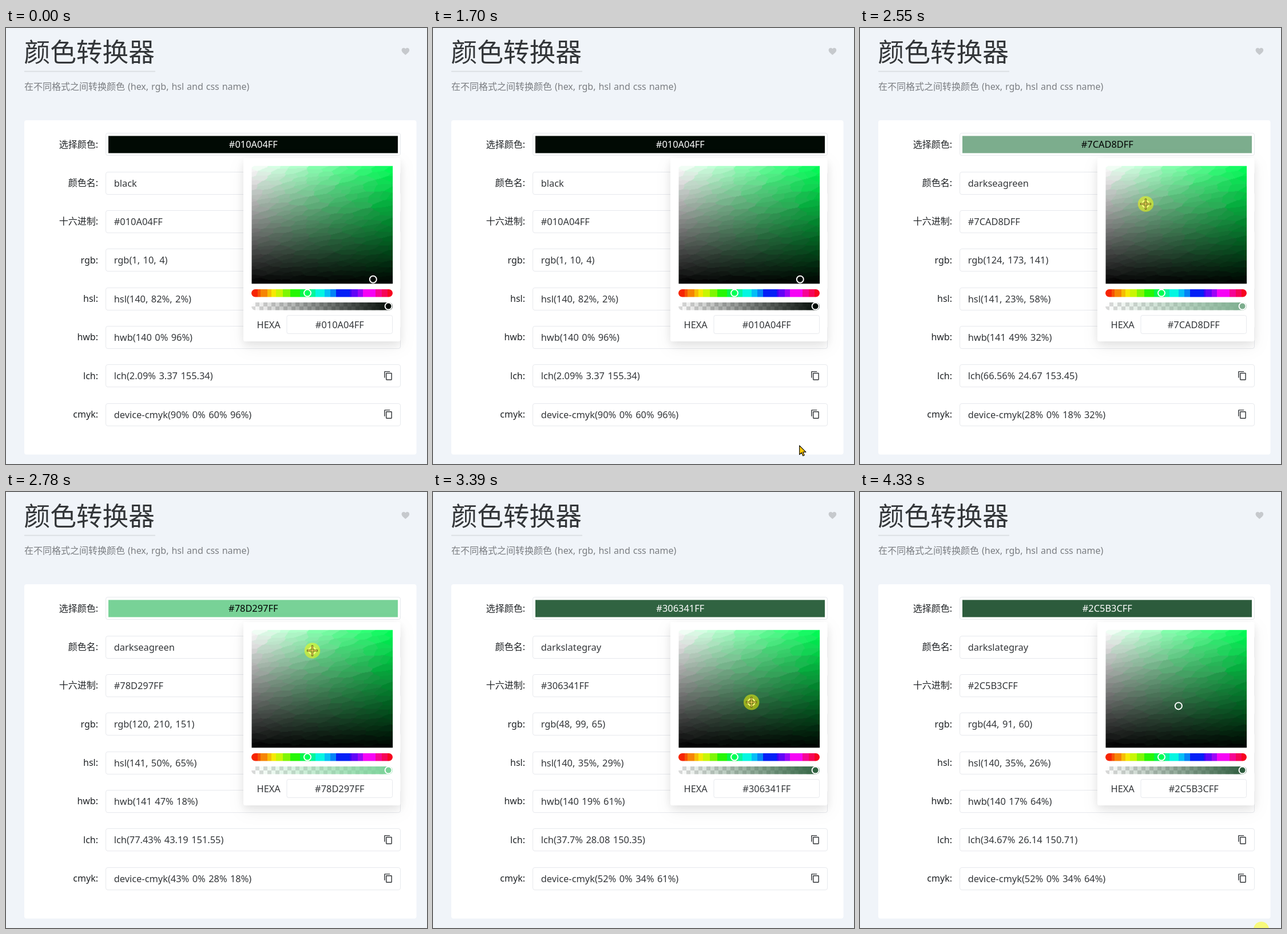
Animation, 736 px wide and 761 px high, one loop 4.4 s. Source, as an HTML page with a canvas:

```html
<!DOCTYPE html>
<html lang="zh-CN">
<head>
<meta charset="utf-8">
<title>颜色转换器</title>
<style>
  html, body { margin: 0; width: 736px; height: 761px; overflow: hidden; background: #f0f4f9; }
  svg, canvas { position: absolute; left: 0; top: 0; display: block; }
  #area { left: 429px; top: 240px; transform: translate(.3px, .6px); }
  text { font: 16.4px "Noto Sans", "Noto Sans CJK SC", sans-serif; fill: #333639; word-spacing: 1.2px; white-space: pre; }
  .title { font-size: 45.7px; font-weight: 300; fill: #333639; }
  .sub { font-size: 16px; fill: #7b7e82; word-spacing: .8px; }
  .label { font-size: 16px; fill: #1f2225; text-anchor: end; }
  .mid { text-anchor: middle; }
  .box { fill: #fff; stroke: #e7e9ed; }
  .glow { fill: none; stroke: #18a058; opacity: 0; }
  .icon { fill: none; stroke: #333639; stroke-width: 2; }
  .ring { stroke: #fff; stroke-width: 2; }
  .popup { fill: #fff; filter: drop-shadow(0 6px 8px rgba(0, 0, 0, .08)) drop-shadow(0 9px 14px rgba(0, 0, 0, .06)); }
</style>
</head>
<body>
<svg id="page" width="736" height="761">
  <defs>
    <pattern id="check" x="429" y="479" width="14" height="14" patternUnits="userSpaceOnUse">
      <path d="M0 0H14V14H0Z" fill="#fff"/>
      <path d="M7 0H14V7H7ZM0 7H7V14H0Z" fill="#dadada"/>
    </pattern>
    <linearGradient id="fade">
      <stop class="tint" offset="0" stop-opacity="0"/>
      <stop class="tint" offset="1"/>
    </linearGradient>
    <linearGradient id="hues"></linearGradient>
    <g id="copy" class="icon" transform="scale(.72) translate(-11.5 -12)">
      <rect x="7" y="6" width="13" height="16" rx="1"/>
      <path d="M3 17V3a1 1 0 0 1 1-1H16"/>
    </g>
  </defs>
  <text class="title" x="31.5" y="59">颜色转换器</text>
  <path d="M32 75.8H261" stroke="#dce0e4" stroke-width="2"/>
  <text class="sub" x="32" y="108">在不同格式之间转换颜色 (hex, rgb, hsl and css name)</text>
  <path transform="translate(698.4 40.8)" fill="#c6c9cd"
    d="M0 6.3C-4.5 2.4-6.8.4-6.8-2.4C-6.8-4.5-5.2-6-3.1-6C-1.9-6-.7-5.4 0-4.5C.7-5.4 1.9-6 3.1-6C5.2-6 6.8-4.5 6.8-2.4C6.8.4 4.5 2.4 0 6.3Z"/>
  <rect x="32" y="161" width="685.5" height="583.5" rx="4" fill="#fff"/>
  <g id="rows"></g>
  <rect id="swatch" x="179" y="188.4" width="506" height="30"/>
  <text id="swatchText" class="mid" x="432.3" y="209"></text>
  <rect class="popup" x="415" y="227" width="274.5" height="320" rx="3"/>
  <rect x="429" y="456" width="247" height="13.5" rx="6.75" fill="url(#hues)"/>
  <circle class="ring" cx="527" cy="462.6" r="6" fill="#00ff56"/>
  <rect x="429" y="479" width="247" height="13.5" rx="6.75" fill="url(#check)"/>
  <rect x="429" y="479" width="247" height="13.5" rx="6.75" fill="url(#fade)"/>
  <circle id="alpha" class="ring" cx="668.6" cy="485.6" r="6"/>
  <text x="438.5" y="523.5">HEXA</text>
  <rect class="box" x="491" y="501.5" width="184.5" height="32" rx="3"/>
  <text id="hexText" class="mid" x="583.3" y="523.5"></text>
</svg>
<canvas id="area" width="247" height="206"></canvas>
<svg id="top" width="736" height="761">
  <circle id="handle" class="ring" r="6"/>
  <circle id="press" r="13.7" fill="#ff0" opacity=".5"/>
  <g id="cross">
    <path d="M-9.5 0H9.5M0-9.5V9.5" stroke="#4a4408" stroke-width="3.2" opacity=".8"/>
    <path d="M-8.5 0H8.5M0-8.5V8.5" stroke="#ffe060" stroke-width="1.2"/>
  </g>
  <path id="arrow" d="M.7.8V16.6L4.3 13.2L6.8 18.7L9.2 17.6L6.8 12.2H11.9Z"
    fill="#ffc800" stroke="#111" stroke-width="1.2" stroke-linejoin="round"/>
</svg>
<script>
const LOOP = 4400;
const AREA = { x: 429, y: 240, w: 247, h: 206 };
const START = [641.5, 437.9];
const ROW_TOP = 183.4, ROW_STEP = 67.3, ROW_H = 39.4;
const $ = id => document.getElementById(id);

function add(parent, tag, attrs, text) {
  const el = document.createElementNS('http://www.w3.org/2000/svg', tag);
  for (const k in attrs) el.setAttribute(k, attrs[k]);
  if (text) el.textContent = text;
  parent.append(el);
  return el;
}

// pointer shape, first time, last time, then one x,y pair per step
const moves = [
  ['none', 0, 0, '0,0'],
  ['arrow', 70, 540, '641,736 520,715 380,640 250,570 140,480 60,410 10,367'],
  ['arrow', 610, 690, '3,361 -4,358'],
  ['none', 760, 760, '0,0'],
  ['arrow', 930, 1390, '-2,349 40,375 115,430 215,505 330,575 430,672 520,714'],
  ['arrow', 1470, 1470, '600,745'],
  ['none', 1550, 1550, '0,0'],
  ['arrow', 1700, 1855, '640,728 602,675 572,540'],
  ['drag', 1930, 2160, '542,428 534,406 530,391 529.05,382.2'],
  ['drag', 2260, 2780, '523,370 514,350 506,330 501,315 498.96,306.24 506,291 520,281 535,276'],
  ['drag', 2860, 3320, '549,276 562,284 571,301 576.25,319.98 579,334 574,347 565,358'],
  ['drag', 3390, 3550, '556.24,366.02 555.8,370.5 556.57,372.49'],
  ['cross', 3630, 3630, '572,408'],
  ['arrow', 3710, 3870, '615,545 665,668 694,703'],
  ['arrow', 3950, 4030, '699,735 701,750'],
  ['none', 4100, 4100, '0,0'],
  ['click', 4330, 4330, '701.5,763.7']
];

const steps = [];
let pick = START;
for (const [kind, from, to, list] of moves) {
  const points = list.split(' ').map(p => p.split(',').map(Number));
  points.forEach(([x, y], i) => {
    const t = from + (to - from) * i / Math.max(1, points.length - 1);
    if (kind === 'drag') pick = [x, y];
    steps.push({ t: Math.floor(t / 10) * 10, kind, x, y, pick });
  });
}

// colour of the picker at saturation s and value v
function shade(s, v) {
  const hi = v * 255, lo = hi * (1 - s);
  return [lo, hi, lo + (hi - lo) * .3373].map(Math.round);
}

const NAMES = {
  black: '000000', darkslategray: '2f4f4f', darkolivegreen: '556b2f', darkgreen: '006400',
  seagreen: '2e8b57', mediumseagreen: '3cb371', darkseagreen: '8fbc8f', cadetblue: '5f9ea0',
  dimgray: '696969', gray: '808080', darkgray: 'a9a9a9', lightgreen: '90ee90', forestgreen: '228b22'
};
const parse = hex => [0, 2, 4].map(i => parseInt(hex.substr(i, 2), 16));

function nearestName(rgb) {
  const gap = n => parse(NAMES[n]).reduce((sum, c, i) => sum + (c - rgb[i]) ** 2, 0);
  return Object.keys(NAMES).reduce((a, b) => gap(b) < gap(a) ? b : a);
}

function toLch(rgb) {
  const [r, g, b] = rgb.map(c => (c /= 255) <= .04045 ? c / 12.92 : ((c + .055) / 1.055) ** 2.4);
  const f = u => u > 216 / 24389 ? Math.cbrt(u) : (24389 / 27 * u + 16) / 116;
  const x = f((.4360747 * r + .3850649 * g + .1430804 * b) / .96422);
  const y = f(.2225045 * r + .7168786 * g + .0606169 * b);
  const z = f((.0139322 * r + .0971045 * g + .7141733 * b) / .82521);
  const p = 500 * (x - y), q = 200 * (y - z);
  return [116 * y - 16, Math.hypot(p, q), (Math.atan2(q, p) * 180 / Math.PI + 360) % 360]
    .map(n => +n.toFixed(2));
}

function describe(rgb) {
  const [r, g, b] = rgb, d = g - r, sum = g + r;
  const pc = n => Math.round(n * 100) + '%';
  const hue = Math.round(120 + 60 * (b - r) / d);
  const light = sum / 510;
  const sat = d / (255 * (1 - Math.abs(2 * light - 1)));
  const [L, C, H] = toLch(rgb);
  const hex = '#' + rgb.map(c => c.toString(16).padStart(2, '0')).join('').toUpperCase() + 'FF';
  return {
    hex, light,
    lines: [
      nearestName(rgb), hex, `rgb(${r}, ${g}, ${b})`,
      `hsl(${hue}, ${pc(sat)}, ${pc(light)})`,
      `hwb(${hue} ${pc(r / 255)} ${pc(1 - g / 255)})`,
      `lch(${L}% ${C} ${H})`,
      `device-cmyk(${pc(d / g)} 0% ${pc((g - b) / g)} ${pc(1 - g / 255)})`
    ]
  };
}

const values = [], glows = [];
['选择颜色', '颜色名', '十六进制', 'rgb', 'hsl', 'hwb', 'lch', 'cmyk'].forEach((name, i) => {
  const y = ROW_TOP + ROW_STEP * i, rows = $('rows');
  const frame = { x: 174.5, y: Math.round(y) + .5, width: 515, height: 39, rx: 3.5 };
  add(rows, 'text', { class: 'label', x: 161, y: y + 25.3 }, name + ':');
  add(rows, 'rect', { ...frame, class: 'box' });
  if (!i) return;
  glows[i] = add(rows, 'rect', { ...frame, class: 'glow' });
  values.push(add(rows, 'text', { x: 188.7, y: y + 26 }));
  // the popup hides the other copy buttons
  if (i > 5) add(rows, 'use', { href: '#copy', x: 668, y: y + 19.6 });
});

// hue strip in plain blocks, each in its middle hue
const edges = [0, 11, 16, 28, 35, 43, 55, 68, 85, 104, 112, 128, 138, 148, 172, 175, 186, 195, 217, 228, 238, AREA.w];
edges.slice(1).forEach((end, i) => {
  const color = `hsl(${(edges[i] + end) / 2 / AREA.w * 360}, 97%, 49%)`;
  for (const x of [edges[i], end]) add($('hues'), 'stop', { offset: x / AREA.w, 'stop-color': color });
});

// picker square: flat cells, each in the shade of its own centre
function paintArea() {
  const { w, h } = AREA, ctx = $('area').getContext('2d');
  const img = ctx.createImageData(w, h), cells = [];
  let seed = 11;
  const rand = () => (seed = seed * 16807 % 2147483647) / 2147483647;
  const unit = n => Math.min(1, Math.max(0, n));
  for (let y = 0; y <= h + 4; y += 7.5) {
    for (let x = 0; x <= w + 10; x += 21) {
      const cx = x + (rand() - .5) * 18, cy = y + (rand() - .5) * 5;
      const s = unit(cx / w), v = unit(1 - cy / h);
      if (rand() > .55 * s * v) cells.push([cx, cy, shade(s, v)]);
    }
  }
  for (let y = 0, k = 0; y < h; y++) {
    for (let x = 0; x < w; x++) {
      let best = 1e9, rgb;
      for (const c of cells) {
        const dx = x - c[0], dy = y - c[1] + dx * .13;
        const d = dx * dx * .12 + dy * dy;
        if (d < best) { best = d; rgb = c[2]; }
      }
      for (const c of rgb) img.data[k++] = c;
      img.data[k++] = 255;
    }
  }
  ctx.putImageData(img, 0, 0);
}

function rowUnder(step) {
  if (!step || step.kind !== 'arrow' || step.x < 174 || step.x > 690) return 0;
  if (step.x > 415 && step.y < 547) return 0;
  const n = (step.y - ROW_TOP) / ROW_STEP;
  return n % 1 < ROW_H / ROW_STEP ? Math.floor(n) : 0;
}

function place(id, on, x, y) {
  $(id).style.display = on ? '' : 'none';
  $(id).setAttribute('transform', `translate(${x} ${y})`);
}

function show(i) {
  const { kind, x, y, pick: [px, py] } = steps[i];
  const rgb = shade((px - AREA.x) / AREA.w, 1 - (py - AREA.y) / AREA.h);
  const info = describe(rgb), css = `rgb(${rgb})`;

  $('swatch').style.fill = $('alpha').style.fill = $('handle').style.fill = css;
  for (const el of document.querySelectorAll('.tint')) el.style.stopColor = css;
  $('swatchText').textContent = $('hexText').textContent = info.hex;
  $('swatchText').style.fill = info.light > .5 ? '#000' : '#fff';
  values.forEach((el, n) => el.textContent = info.lines[n]);

  const now = rowUnder(steps[i]), before = rowUnder(steps[i - 1]);
  glows.forEach((el, n) => el.style.opacity = n === now ? 1 : n === before ? .4 : 0);

  const drag = kind === 'drag', off = drag ? [x + .5, y + .9] : [x, y];
  place('handle', true, px + .3, py + .9);
  place('arrow', kind === 'arrow', x, y);
  place('cross', drag || kind === 'cross', ...off);
  place('press', drag || kind === 'click', ...off);
}

let shown = -1;
function tick() {
  const t = performance.now() % LOOP;
  let i = steps.length - 1;
  while (steps[i].t > t) i--;
  if (i !== shown) show(shown = i);
  requestAnimationFrame(tick);
}

paintArea();
tick();
</script>
</body>
</html>
```
